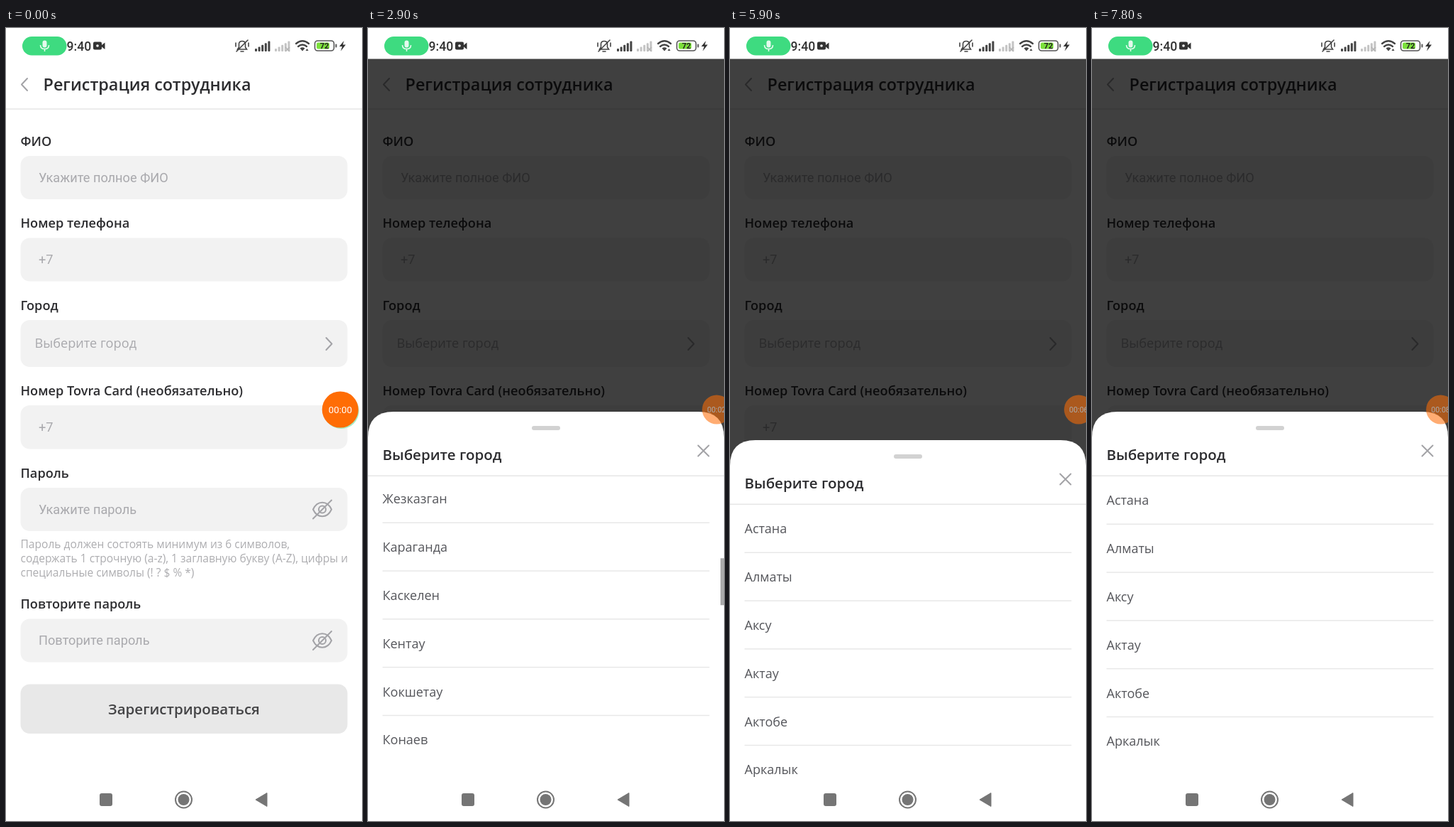
Recreate the animation shown at these times as an HTML page. Size 502 by 1116 pixels, loop 8000 ms.

```html
<!DOCTYPE html>
<html lang="ru">
<head>
<meta charset="utf-8">
<style>
  html, body { margin: 0; width: 100%; height: 100%; overflow: hidden; background: #fff; }
  svg { display: block; width: 502px; height: 1116px; }
  text { font: 400 18px "Open Sans", "Noto Sans", sans-serif; fill: #55565b; }
  .label { font-weight: 600; font-size: 18.15px; fill: #2d2d30; }
  .title { font-weight: 600; font-size: 23.4px; fill: #2d2d30; }
  .heading { font-weight: 600; font-size: 20.5px; fill: #2d2d30; }
  .input { font-family: Roboto, sans-serif; font-size: 18.2px; fill: #a9a9ad; }
  .choice { font-size: 18.15px; fill: #a9a9ad; }
  .hint { font-size: 15.55px; fill: #adadb0; }
  .clock { font: 500 17.6px Roboto, sans-serif; fill: #333; }
  .charge { font: 700 11px Roboto, sans-serif; fill: #222; }
  .timer { font: 400 13.3px Roboto, sans-serif; fill: #fff; }
  .field { fill: #f2f2f2; }
  .icon { fill: none; stroke: #a3a3a7; stroke-width: 2; stroke-linecap: round; stroke-linejoin: round; }
</style>
</head>
<body>
<svg viewBox="0 0 502 1116">
  <defs>
    <clipPath id="listArea"><rect y="631" width="502" height="384.5"/></clipPath>
    <g id="eye" class="icon">
      <path d="M-13 0C-7-13 7-13 13 0C7 13-7 13-13 0Z"/>
      <circle r="5"/>
      <path d="M-13 13L13-13"/>
    </g>
  </defs>
  <rect width="502" height="1116" fill="#fff"/>

  <g id="form">
    <path class="icon" d="M30 71L22 79.500L30 88"/>
    <text class="title" x="52.500" y="87.500">Регистрация сотрудника</text>
    <rect y="113" width="502" height="2" fill="#ececec"/>
    <path class="icon" d="M451.500 436L459.500 444.500L451.500 453"/>
  </g>

  <rect id="dim" y="43.500" width="502" height="1012" fill="#000"/>

  <g id="sheet">
    <path d="M0 1116V576Q0 540 36 540H466Q502 540 502 576V1700H0Z" fill="#fff"/>
    <rect x="231" y="560" width="40" height="6" rx="3" fill="#d2d2d2"/>
    <text class="heading" x="20.500" y="608">Выберите город</text>
    <path class="icon" d="M465.500 587.500L480.500 602.500M480.500 587.500L465.500 602.500"/>
    <rect y="629.500" width="502" height="1.500" fill="#e6e6e6"/>
    <g clip-path="url(#listArea)">
      <g id="list"></g>
      <rect id="thumb" x="497" y="631" width="5" height="66" fill="#aaa"/>
    </g>
  </g>

  <g id="navigation">
    <rect y="1055.500" width="502" height="61" fill="#fff"/>
    <g fill="#757575">
      <rect x="132" y="1077" width="18" height="18" rx="3"/>
      <circle cx="250.500" cy="1086" r="8"/>
      <circle cx="250.500" cy="1086" r="11.500" fill="none" stroke="#757575" stroke-width="2"/>
      <path d="M352 1086L368 1076.500V1095.500Z" stroke="#757575" stroke-linejoin="round"/>
    </g>
  </g>

  <g id="status">
    <rect x="23" y="12" width="62.500" height="26.500" rx="13.250" fill="#3edb80"/>
    <rect x="51.500" y="17.500" width="6" height="10" rx="3" fill="#e4faed"/>
    <path d="M48.500 24Q48.500 29.500 54.500 29.500Q60.500 29.500 60.500 24M54.500 29.500V33" fill="none" stroke="#e4faed" stroke-width="1.600"/>
    <text class="clock" x="85.500" y="31.700">9:40</text>
    <rect x="123" y="19.500" width="12" height="11" rx="2" fill="#333"/>
    <path d="M135 24L139.500 20.500V30L135 26.500Z" fill="#333"/>
    <circle cx="129" cy="25" r="1.800" fill="#fff"/>
    <g fill="none" stroke="#444" stroke-width="1.600" stroke-linecap="round">
      <path d="M326.500 30H339.500L337.500 27V22Q337 18.500 333 18.500Q329 18.500 328.500 22V27ZM331 33H335M341 17L325 33M324 21V26M342 21V26"/>
      <path d="M409 22Q418 14.500 427 22M412 26Q418 21 424 26" stroke-width="2.300"/>
    </g>
    <path d="M414.500 28.500Q418 26 421.500 28.500L418 32.500Z" fill="#444"/>
    <path d="M422.500 32L424.500 29L426.500 32Z" fill="#444"/>
    <g id="bars"></g>
    <path d="M394 27L400 33M400 27L394 33" stroke="#b5b5b5" stroke-width="1.500"/>
    <rect x="435.500" y="18" width="27" height="14" rx="4" fill="#fff" stroke="#555" stroke-width="1.600"/>
    <rect x="438" y="20.500" width="18" height="9" rx="2" fill="#7be03a"/>
    <rect x="464.500" y="22.500" width="2" height="5" rx="1" fill="#555"/>
    <text class="charge" x="449" y="29" text-anchor="middle">72</text>
    <path d="M476.500 18L470 26H474L472 32.500L479 23.500H475Z" fill="#333"/>
  </g>

  <g id="bubble">
    <circle id="rim" cx="1.500" cy="2" r="25" fill="#a6ecc5"/>
    <circle r="25.600" fill="#ff6d05"/>
    <text id="timer" class="timer" y="4.800" text-anchor="middle"></text>
  </g>
</svg>

<script>
const $ = id => document.getElementById(id);

function add(parent, tag, attrs, content = '') {
  const el = document.createElementNS('http://www.w3.org/2000/svg', tag);
  for (const key in attrs) el.setAttribute(key, attrs[key]);
  el.textContent = content;
  return $(parent).appendChild(el);
}
const write = (parent, cls, x, y, content) => add(parent, 'text', { class: cls, x, y }, content);

// label, field top, field height, placeholder, placeholder class
const fields = [
  ['ФИО', 180, 61, 'Укажите полное ФИО', 'input'],
  ['Номер телефона', 295.5, 61, '+7', 'input'],
  ['Город', 411, 66, 'Выберите город', 'choice'],
  ['Номер Tovra Card (необязательно)', 531, 61.5, '+7', 'input'],
  ['Пароль', 647, 61, 'Укажите пароль', 'input'],
  ['Повторите пароль', 831.5, 61, 'Повторите пароль', 'input']
];
for (const [label, y, height, placeholder, cls] of fields) {
  write('form', 'label', 20.5, y - 14.5, label);
  const box = add('form', 'rect', { class: 'field', x: 20.5, y, width: 461, height, rx: 13 });
  $('form').prepend(box);
  write('form', cls, cls === 'input' ? 46 : 40.5, y + height / 2 + 6.3, placeholder);
  if (label.toLowerCase().includes('пароль'))
    add('form', 'use', { href: '#eye', x: 446, y: y + height / 2 });
}
['Пароль должен состоять минимум из 6 символов,',
 'содержать 1 строчную (a-z), 1 заглавную букву (A-Z), цифры и',
 'специальные символы (! ? $ % *)'
].forEach((line, i) => write('form', 'hint', 20.5, 731.5 + i * 20.45, line));

add('form', 'rect', { x: 20.5, y: 923.5, width: 461, height: 69.5, rx: 13, fill: '#e8e8e8' });
const button = write('form', 'heading', 251, 966, 'Зарегистрироваться');
button.setAttribute('text-anchor', 'middle');
button.style.fill = '#444446';

const cities = ('Астана Алматы Аксу Актау Актобе Аркалык Атырау Байконур Балхаш Жанаозен ' +
  'Жезказган Караганда Каскелен Кентау Кокшетау Конаев Костанай Кульсары Кызылорда Павлодар').split(' ');
cities.forEach((city, i) => {
  write('list', '', 20.5, 671.3 + i * 67.8, city);
  add('list', 'rect', { x: 20.5, y: 697.5 + i * 67.8, width: 461, height: 1.5, fill: '#e8e8e8' });
});

for (const [left, fill] of [[351, '#444'], [379, '#c4c4c4']])
  for (let i = 0; i < 5; i++)
    add('bars', 'rect', { x: left + i * 4.6, y: 29 - i * 2.6, width: 3, height: 4 + i * 2.6, rx: 1, fill });

// Linear interpolation through [time, value] points.
function track(t, points) {
  const next = points.findIndex(p => p[0] > t);
  if (next < 0) return points[points.length - 1][1];
  if (next === 0) return points[0][1];
  const [t0, a] = points[next - 1], [t1, b] = points[next];
  return a + (b - a) * (t - t0) / (t1 - t0);
}

const HIDDEN = 576;
const opening = start => [[start, HIDDEN], [start + 100, 370], [start + 200, 90], [start + 300, 0]];
const fadeIn = start => [[start - 100, 0], [start, 0.1], [start + 100, 0.42], [start + 200, 0.68], [start + 300, 0.75]];

const sheetTrack = [...opening(900), [3900, 0], [4200, 45], [4800, 220], [4900, 225], [5200, 110], [5500, 0],
  [5800, 0], [5900, 40], [6100, 300], [6300, HIDDEN], ...opening(7500)];
const dimTrack = [...fadeIn(900), [6300, 0.75], [6400, 0.55], [6500, 0.32], [6600, 0.1], [6700, 0], ...fadeIn(7500)];
const scrollTrack = [[2000, 0], [2100, 89], [2300, 330], [2600, 580], [2900, 680], [3300, 420], [3600, 90], [3800, 0]];
const ticks = [1000, 2200, 3000, 3800, 4900, 5900, 7200, 7800];

function draw(t) {
  const scroll = track(t, scrollTrack);
  $('sheet').setAttribute('transform', `translate(0 ${track(t, sheetTrack)})`);
  $('dim').setAttribute('opacity', track(t, dimTrack));
  $('list').setAttribute('transform', `translate(0 ${-scroll})`);
  $('thumb').setAttribute('y', 631 + scroll / 5.9);
  $('thumb').setAttribute('opacity', (t >= 1300 && t < 1800) || (t >= 2100 && t < 4100) ? 1 : 0);

  const dock = track(t, [[1400, 0], [1700, 1]]);
  $('bubble').setAttribute('transform', `translate(${471.3 + dock * 20.3} 537) scale(${1 - dock * 0.2})`);
  $('bubble').setAttribute('opacity', t < 1800 ? 1 : 0.56);
  $('rim').setAttribute('opacity', 1 - dock);
  $('timer').textContent = '00:0' + ticks.filter(tick => tick <= t).length;
}

const start = performance.now();
function frame() {
  const elapsed = (performance.now() - start) % 8000;
  draw(Math.floor(elapsed / 100) * 100);
  requestAnimationFrame(frame);
}
frame();
</script>
</body>
</html>
```
